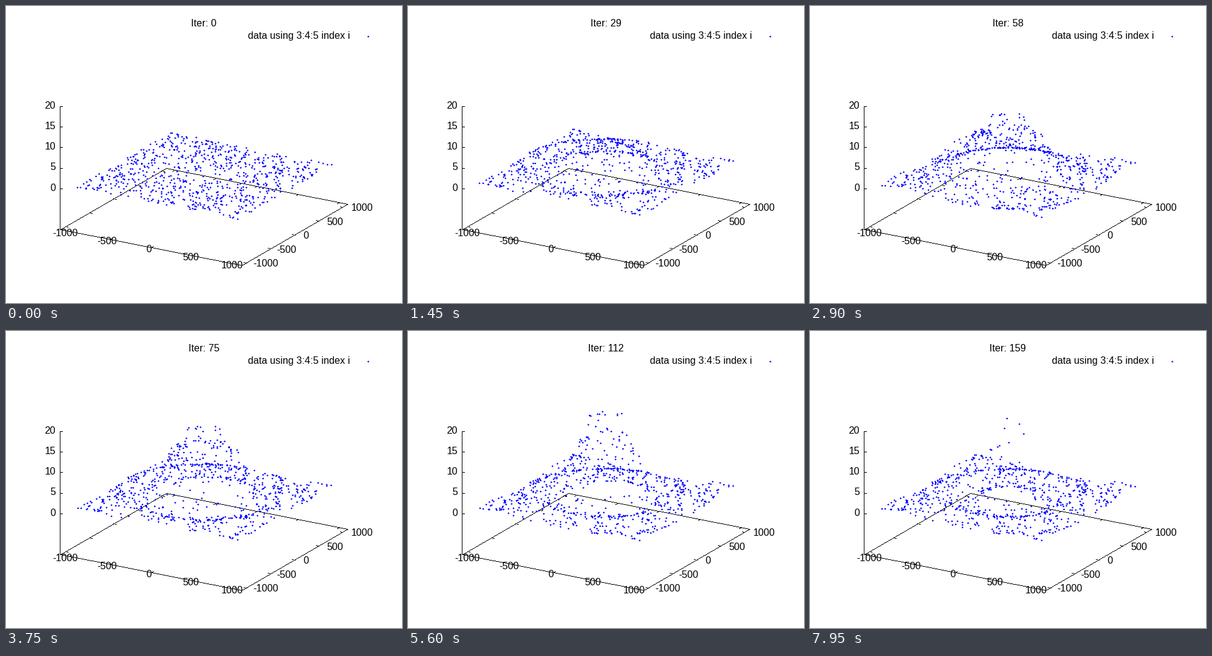
A matplotlib script for the animation above (8 s loop, 640 px wide and 480 px high).

```python
import numpy as np
import matplotlib.pyplot as plt
from matplotlib.animation import FuncAnimation
from matplotlib.collections import PolyCollection

W, H, DPI = 640, 480, 80
FRAMES, STEP = 160, 50
PERIOD = 47.5
COUNT = 790

plt.rcParams["font.family"] = "Liberation Sans"
fig = plt.figure(figsize=(W / DPI, H / DPI), dpi=DPI, facecolor="white")
ax = fig.add_axes([0, 0, 1, 1])
ax.set_xlim(0, W)
ax.set_ylim(H, 0)
ax.axis("off")

# Screen vectors for 1000 units along x and y, and pixels for one unit of z
BASIS = np.array([[133.2, 26.4], [77.7, -45.0]])
EX, EY = BASIS
EZ = 6.65
CENTRE = np.array([320.0, 274.2])
FLOOR = np.array([320.0, 340.5])
LIMIT = 1.1

SQUARE = np.array([(0, 0), (1, 0), (1, 1), (0, 1)])
PLUS = np.array([(1, 0), (2, 0), (2, 1), (3, 1), (3, 2), (2, 2),
                 (2, 3), (1, 3), (1, 2), (0, 2), (0, 1), (1, 1)]) - 1


def stamp(points, shape):
    return np.floor(np.asarray(points) + 0.5)[:, None, :] + shape


def add_stamps(points, shape, color, zorder):
    marks = PolyCollection(stamp(points, shape), facecolors=color,
                           edgecolors="none", linewidths=0,
                           antialiaseds=False, zorder=zorder)
    ax.add_collection(marks, autolim=False)
    return marks


def line(a, b):
    """One-pixel line made of whole pixels."""
    a, b = np.round(a), np.round(b)
    n = int(np.abs(b - a).max()) + 1
    add_stamps(np.linspace(a, b, n), SQUARE, "black", 1)


def label(x, y, s, ha):
    return ax.text(x, y, s, ha=ha, va="baseline", fontsize=16 * 72 / DPI,
                   color="black", zorder=3)


def floor_point(x, y):
    return FLOOR + x * EX + y * EY


def draw_axes():
    corners = [floor_point(LIMIT * i, LIMIT * j)
               for i, j in ((-1, -1), (1, -1), (1, 1), (-1, 1))]
    for a, b in zip(corners, corners[1:] + corners[:1]):
        line(a, b)
    line((87, 361), (87, 162))

    dx, dy = EX * 0.033, EY * 0.045
    for i in range(5):
        v = i / 2 - 1
        front, back = floor_point(v, -LIMIT), floor_point(v, LIMIT)
        line(front, front + dy)
        line(back, back - dy)
        label(95.7 + 67.5 * i, 372 + 13.1 * i, f"{v * 1000:.0f}", "center")

        left, right = floor_point(-LIMIT, v), floor_point(LIMIT, v)
        line(left, left + dx)
        line(right, right - dx)
        pad = 10 if v < 0 else 13.5
        label(right[0] + pad, right[1] + 6.5, f"{v * 1000:.0f}", "left")

        z = 295 - 33.25 * i
        line((87, z), (91, z))
        label(80, z + 3.7, str(5 * i), "right")


def make_nodes():
    """Scattered nodes, thinner near the middle, with one at each corner."""
    rng = np.random.default_rng(12)
    nodes = rng.uniform(-0.985, 0.985, (COUNT, 2))
    keep = rng.random(COUNT) < 0.1 + 3 * np.hypot(*nodes.T)
    corners = [(i, j) for i in (-0.97, 0.98) for j in (-0.98, 0.97)]
    return np.vstack([nodes[keep], corners])


def height(r, t):
    peak = 21 * np.sin(np.pi * t / 260)
    width = 0.5 - 0.28 * (t / FRAMES) ** 2.2
    hump = np.exp(-(r / width) ** (3 + t / 120))
    swell = 0.55 * (1 - np.cos(2 * np.pi * t / PERIOD))
    phase = (r - 0.75) / 0.55 - (t - 112) / PERIOD
    fade = np.clip((1.35 - r) / 0.35, 0, 1) * min(1, t / 30)
    ripple = 0.8 * fade * np.cos(2 * np.pi * phase)
    return peak * hump + (1 - hump) * (swell + ripple)


NODES = make_nodes()
RADIUS = np.hypot(*NODES.T)
GAIN = np.random.default_rng(5).normal(1, 0.05, len(NODES))


def project(t):
    pull = 1 - 0.006 * min(1, t / 60)
    points = CENTRE + pull * (NODES @ BASIS)
    points[:, 1] -= EZ * GAIN * height(RADIUS, t)
    return points


draw_axes()
label(556, 53, "data using 3:4:5 index i", "right")
title = label(319.7, 33, "Iter: 0", "center")
dots = add_stamps(project(0), PLUS, "blue", 2)
add_stamps([(585, 49)], PLUS, "blue", 2)


def update(t):
    title.set_text(f"Iter: {t}")
    dots.set_verts(stamp(project(t), PLUS))
    return title, dots


anim = FuncAnimation(fig, update, frames=FRAMES, interval=STEP,
                     init_func=lambda: update(0), repeat=True, repeat_delay=0,
                     blit=False)
plt.show()
```
